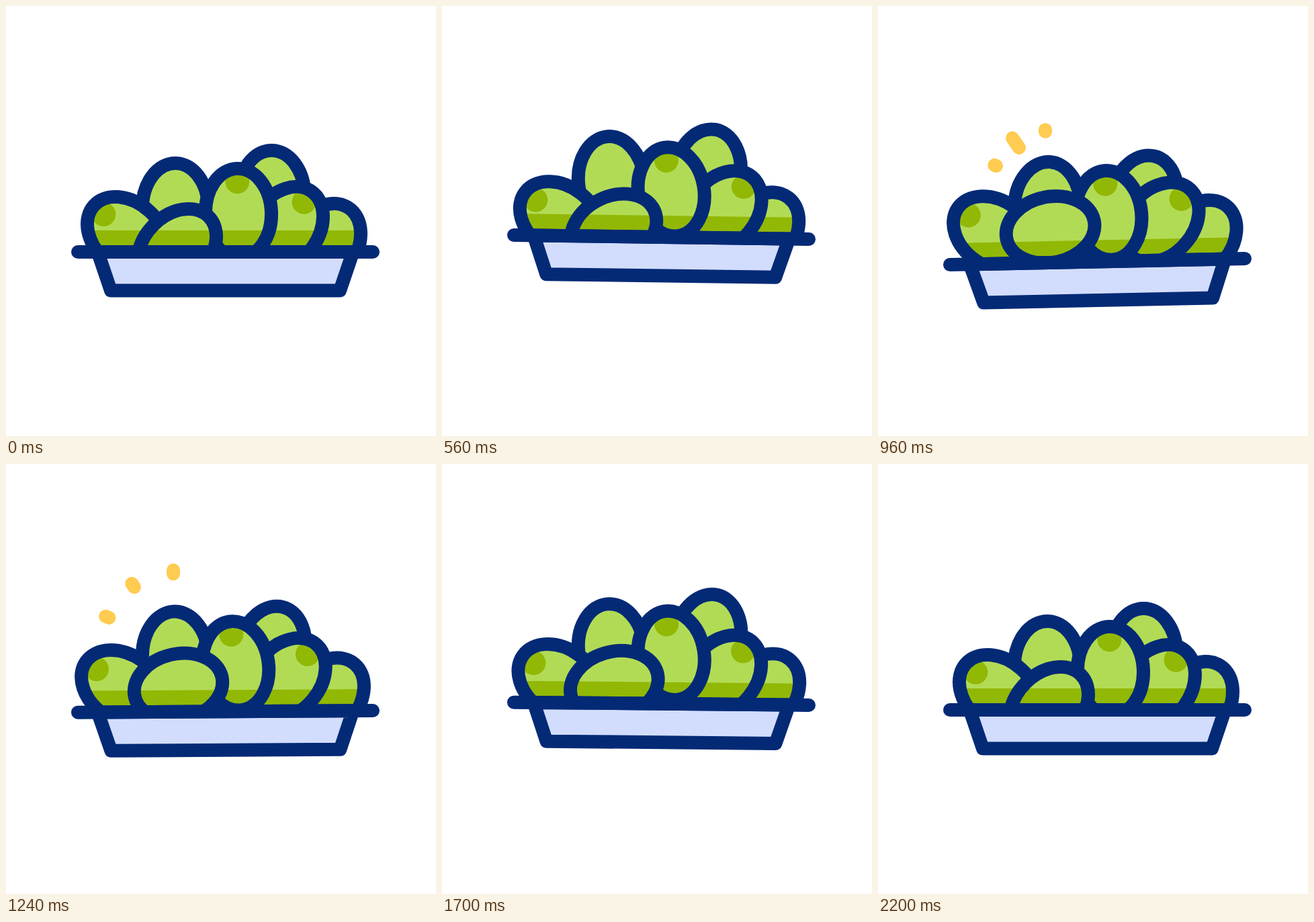
These frames come from a looping animation (640 px wide and 640 px high, 2.8 s). An HTML page:

```html
<!DOCTYPE html>
<html lang="en">
<head>
<meta charset="utf-8">
<title>Bouncing olives</title>
<style>
  html, body { margin: 0; width: 100%; height: 100%; overflow: hidden; background: #fff; }
  svg { display: block; width: 100%; height: 100%; }
  .line { stroke: #042a76; stroke-width: 20; stroke-linecap: round; stroke-linejoin: round; }
  .spark { stroke: #ffcb50; stroke-width: 20; stroke-linecap: round; }
</style>
</head>
<body>
<svg viewBox="0 0 640 640">
  <defs>
    <ellipse id="olive" rx="49" ry="66.5"/>
    <clipPath id="aboveRim"><rect class="follow" x="-50" y="-100" width="740" height="466"/></clipPath>
    <clipPath id="shade"><rect class="follow" x="-50" y="334" width="740" height="150"/></clipPath>
  </defs>
  <g id="olives" clip-path="url(#aboveRim)"></g>
  <g class="follow line">
    <path d="M136.5 366L156 423.5H497L516.5 366Z" fill="#d2ddfd"/>
    <path d="M107 366H546"/>
  </g>
  <g id="sparks"></g>
</svg>
<script>
const LOOP = 2800, STEP = 20;
const LIGHT = '#b2db55', DARK = '#92b806';

// Back to front. turn: extra degrees, sway: sideways px per degree, lift: vertical px.
const OLIVES = [
  { x: 252, y: 300.5, angle: 0, sway: 0, turn: [-9, 3, -6, -4], lift: [-15, -40, -33.5, -2, -43, -6] },
  { x: 395.3, y: 281.5, angle: 0, sway: 0, turn: [17, 15, 14, 9], lift: [-10, -32, -23.5, 6.5, -30, -9.7] },
  { x: 472.9, y: 355.6, angle: 34, sway: .4, turn: [8, 8, 6, 6], lift: [-1, -18, -19.3, -7.3, -16.7, -7.7] },
  { x: 416.6, y: 330.3, angle: 35, sway: .5, turn: [8, 7, 3, 5], lift: [-3, -25, -29.3, -8.3, -24.8, -4], spot: true },
  { x: 346, y: 308.4, angle: -2, sway: .7, turn: [-12, -4, -8, -4.5], lift: [-10, -32, -28, 3, -34.3, -9], spot: true },
  { x: 180.3, y: 341.5, angle: -48, sway: .98, turn: [-7, -7, -7, -4], lift: [-4, -24, -29, -3, -28, -5.2], spot: true },
  { x: 254.6, y: 360.4, angle: 45, sway: .06, turn: [33, 33, 30, 27], lift: [-1, -28, -43.5, -27.5, -40, -18.5] }
];
const TURN_TIMES = [340, 740, 960, 1520, 1880, 2200];
const LIFT_TIMES = [200, 380, 560, 740, 960, 1030, 1520, 1880, 2200];

const TRAY_TIMES = [200, 380, 560, 740, 960, 990, 1560, 1850];
const TRAY_LEFT = [0, -7, -25, -18, 19, 21, -21.5, 0];
const TRAY_RIGHT = [0, -6.3, -19, -10, 10, 11, -13.5, 0];

// Inner end, direction in degrees, full length, delay.
const BURSTS = [
  { start: 935, rays: [[249, 187, -90, 29, 20], [210, 211, -124.5, 40, 0], [176, 238, -158, 30, 20]] },
  { start: 1822, rays: [[422, 172, -75.4, 33, 16], [453, 203, -39.8, 40, 0], [478, 241, 0, 30, 10]] }
];

const clamp = v => Math.min(1, Math.max(0, v));
const smooth = v => v * v * (3 - 2 * v);

// Monotone cubic interpolation: flat at extremes, smooth in between.
function track(times, values, t) {
  const last = times.length - 1;
  if (t <= times[0]) return values[0];
  if (t >= times[last]) return values[last];
  const i = times.findIndex(k => k > t) - 1;
  const slope = j => (values[j + 1] - values[j]) / (times[j + 1] - times[j]);
  const tangent = j => {
    if (j === 0 || j === last) return 0;
    const a = slope(j - 1), b = slope(j);
    return a * b > 0 ? 2 * a * b / (a + b) : 0;
  };
  const h = times[i + 1] - times[i], u = (t - times[i]) / h;
  return values[i] + (values[i + 1] - values[i]) * smooth(u)
    + h * u * (1 - u) * (tangent(i) * (1 - u) - tangent(i + 1) * u);
}

function add(parent, tag, attrs = {}) {
  const node = document.createElementNS('http://www.w3.org/2000/svg', tag);
  for (const name in attrs) node.setAttribute(name, attrs[name]);
  return parent.appendChild(node);
}

const olivesLayer = document.getElementById('olives');
const sparksLayer = document.getElementById('sparks');
const followers = document.querySelectorAll('.follow');

for (const o of OLIVES) {
  const body = add(olivesLayer, 'g');
  add(body, 'use', { href: '#olive', fill: LIGHT });
  if (o.spot) add(body, 'circle', { cy: -47, r: 18, fill: DARK });
  const shaded = add(olivesLayer, 'g', { 'clip-path': 'url(#shade)' });
  const shadow = add(shaded, 'use', { href: '#olive', fill: DARK });
  const outline = add(olivesLayer, 'use', { href: '#olive', fill: 'none', class: 'line' });
  o.parts = [body, shadow, outline];
  o.turns = [0, ...o.turn, 0];
  o.lifts = [0, ...o.lift.slice(0, 4), o.lift[3] + 6, ...o.lift.slice(4), 0];
}

const rays = BURSTS.flatMap(({ start, rays }) => rays.map(([x, y, angle, length, delay]) => ({
  start: start + delay,
  end: start + 360,
  length,
  node: add(sparksLayer, 'line', { class: 'spark', transform: `translate(${x} ${y}) rotate(${angle})` })
})));

function draw(t) {
  const left = track(TRAY_TIMES, TRAY_LEFT, t), right = track(TRAY_TIMES, TRAY_RIGHT, t);
  const tilt = Math.atan2(right - left, 439) * 180 / Math.PI;
  for (const node of followers) {
    node.setAttribute('transform', `translate(0 ${(left + right) / 2}) rotate(${tilt} 326.5 366)`);
  }

  for (const o of OLIVES) {
    const turn = track(TURN_TIMES, o.turns, t);
    const lift = track(LIFT_TIMES, o.lifts, t);
    const pose = `translate(${o.x + o.sway * turn} ${o.y + lift}) rotate(${o.angle + turn})`;
    for (const part of o.parts) part.setAttribute('transform', pose);
  }

  for (const { start, end, length, node } of rays) {
    const grow = clamp((t - start) / 100);
    const shrink = clamp((t - start - 140) / (end - start - 140));
    node.setAttribute('x1', length * smooth(shrink));
    node.setAttribute('x2', length * (1 - (1 - grow) ** 2));
    node.setAttribute('visibility', t > start && t < end ? 'visible' : 'hidden');
  }
}

const began = performance.now();
function frame() {
  const t = (performance.now() - began) % LOOP;
  draw(Math.floor(t / STEP) * STEP);
  requestAnimationFrame(frame);
}
frame();
</script>
</body>
</html>
```
